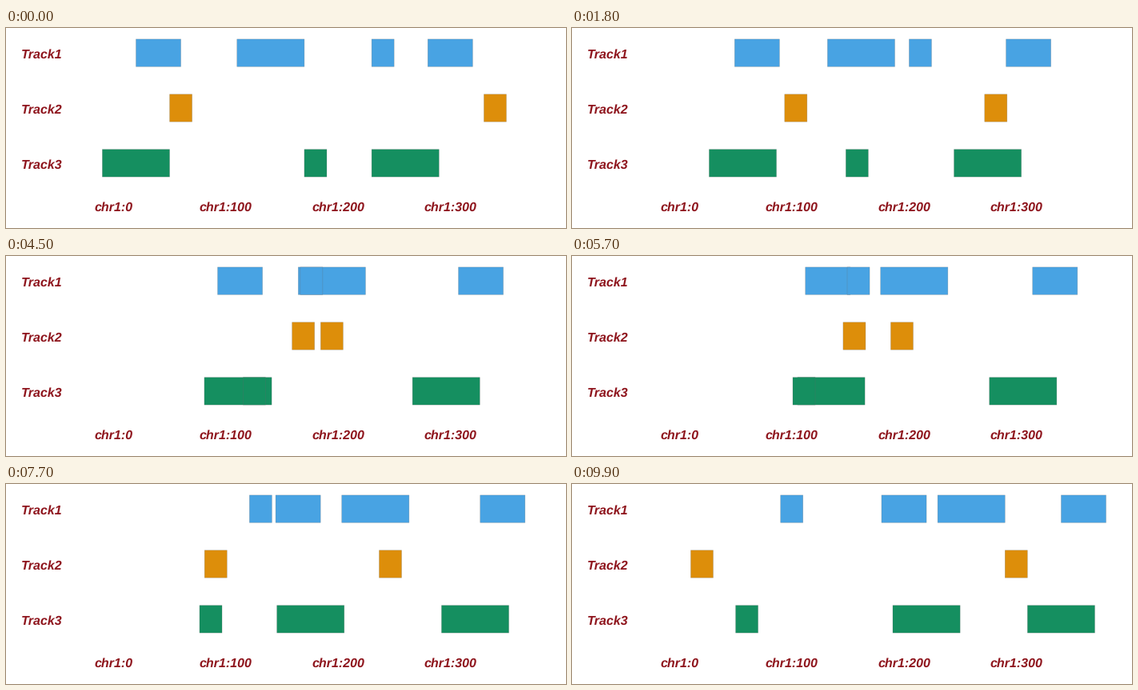
Animation of 700 by 250 pixels, one loop 10 s. Source, as a matplotlib script:

```python
import matplotlib.pyplot as plt
from matplotlib.animation import FuncAnimation
from matplotlib.patches import Rectangle

WIDTH, HEIGHT, DPI = 700, 250, 100
FRAMES, INTERVAL = 100, 100
ORIGIN, SCALE = 134.4, 1.403   # pixel of chr1:0, pixels per base
TOP, PITCH, BAR = 13.9, 68.9, 34.4

# name, colour, intervals as (first start, last start, length)
TRACKS = [
    ("Track1", "#48a3e3",
     [(20, 180, 40), (110, 230, 60), (230, 90, 20), (280, 340, 40)]),
    ("Track2", "#dd8e0a", [(50, 290, 20), (330, 10, 20)]),
    ("Track3", "#158f60", [(-10, 190, 60), (170, 50, 20), (230, 310, 60)]),
]

plt.rcParams["text.hinting"] = "none"
plt.rcParams["text.hinting_factor"] = 1

fig = plt.figure(figsize=(WIDTH / DPI, HEIGHT / DPI), dpi=DPI, facecolor="white")
ax = fig.add_axes([0, 0, 1, 1])
ax.set_xlim(0, WIDTH)
ax.set_ylim(HEIGHT, 0)
ax.axis("off")


def to_px(base):
    return ORIGIN + SCALE * base


def label(x, y, text, align):
    ax.text(x, y, text, ha=align, va="baseline", color="#8e141c",
            family="Liberation Sans", size=16 * 72 / DPI,
            weight="bold", style="italic")


bars = []
for row, (name, color, spans) in enumerate(TRACKS):
    y = TOP + row * PITCH
    label(18.4, y + 24, name, "left")
    for start, end, length in spans:
        bar = Rectangle((to_px(start), y), length * SCALE, BAR, facecolor=color,
                        edgecolor=(0.4, 0.4, 0.4, 0.4), linewidth=0.4, snap=False)
        ax.add_patch(bar)
        bars.append((bar, start, end))

for base in range(0, 301, 100):
    label(to_px(base), 229, f"chr1:{base}", "center")


def update(frame):
    t = frame / (FRAMES - 1)
    for bar, start, end in bars:
        bar.set_x(to_px(start + (end - start) * t))
    return [bar for bar, _, _ in bars]


anim = FuncAnimation(fig, update, frames=FRAMES, interval=INTERVAL,
                     repeat=True, repeat_delay=0, blit=False)
plt.show()
```
